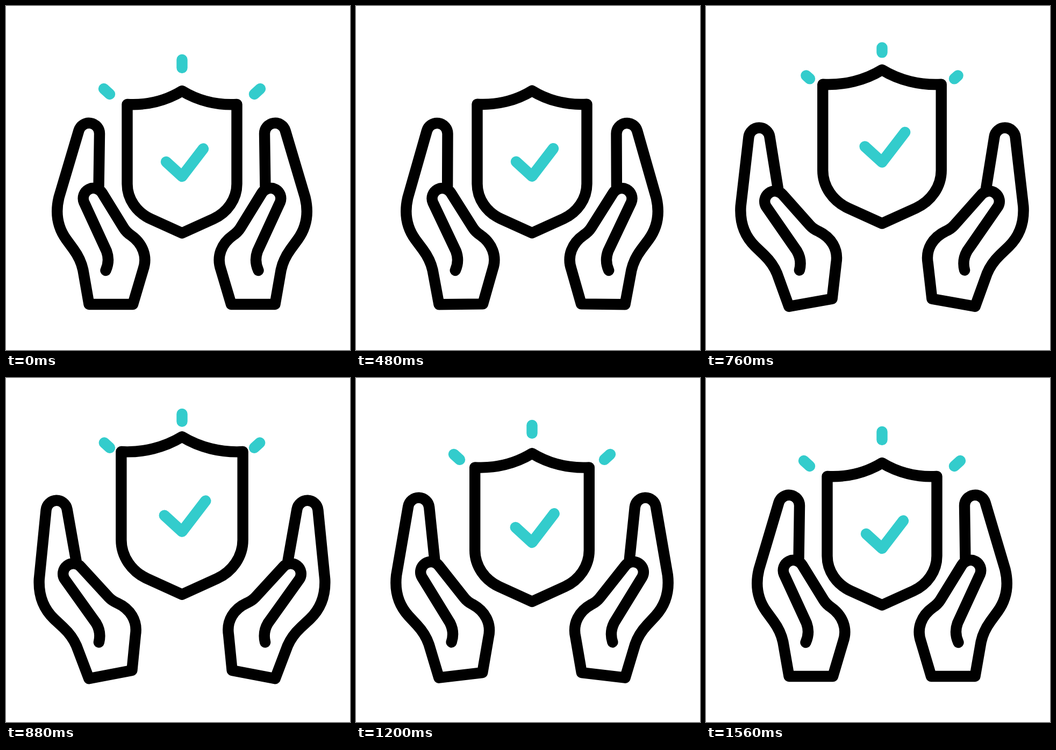
An HTML page for the animation above (1680 ms loop, 640 by 640 pixels).

```html
<!DOCTYPE html>
<html lang="en">
<head>
<meta charset="utf-8">
<title>Protected shield</title>
<style>
  html, body { margin: 0; height: 100%; overflow: hidden; background: #fff; }
  svg { display: block; width: 100vw; height: 100vh; }
  path { fill: none; stroke: #000; stroke-linecap: round; stroke-linejoin: round; }
  .teal { stroke: #33cccc; }
</style>
</head>
<body>
<svg viewBox="0 0 640 640" stroke-width="20.4">
  <defs>
    <g id="hand">
      <path d="M172.5 338L174 238A19.7 19.7 0 0 0 135.4 231.9L98.5 356
        C91.5 385 95.5 411 112 434L125.5 452.5Q139 471 143.3 491L154.5 555H236L255 491
        C264 466 254 442 233 427Q224 421 219 413L178.9 347.9A19 19 0 0 0 145.2 365.2L187 456
        C191 467 191 480 185.5 492"/>
    </g>
  </defs>
  <use href="#hand" id="left"/>
  <g transform="translate(655 0) scale(-1 1)"><use href="#hand" id="right"/></g>
  <g id="shield">
    <path d="M327.5 158C298 176 262 185 225.5 183V331C225.5 359 243 384 269 396
      L327.5 422.5L386 396C412 384 429.5 359 429.5 331V183C393 185 357 176 327.5 158Z"/>
    <path class="teal" d="M298 290L327.5 317L367 265.5"/>
  </g>
  <path class="teal" id="rays"/>
</svg>
<script>
const LOOP = 1680, STROKE = 20.4;
const $ = id => document.getElementById(id);
// Each ray: inner end, then the offset to its outer end.
const rays = [[327.5, 115, 0, -15], [193, 164, -11, -10], [462, 164, 11, -10]];

// Cubic ease-in-out from 0 to 1 between two times.
function ramp(t, start, end) {
  const u = Math.min(1, Math.max(0, (t - start) / (end - start)));
  return u < 0.5 ? 4 * u ** 3 : 1 - 4 * (1 - u) ** 3;
}
const pulse = (t, upStart, upEnd, downStart, downEnd) =>
  ramp(t, upStart, upEnd) * (1 - ramp(t, downStart, downEnd));

function draw(now) {
  const t = now % LOOP;
  const tilt = `rotate(${-10.9 * pulse(t, 340, 920, 912, 1547)} 177 558)`;
  const lift = -34.5 * pulse(t, 410, 950, 890, 1450);
  const scale = 1 + 0.11 * pulse(t, 505, 935, 965, 1400);
  const length = 1 - ramp(t, -30, 400) + ramp(t, 440, 1040);

  $('left').setAttribute('transform', tilt);
  $('right').setAttribute('transform', tilt);
  $('shield').setAttribute('transform',
    `translate(327.5 ${290.5 + lift}) scale(${scale}) translate(-327.5 -290.5)`);
  // The shield grows but its line weight stays the same.
  $('shield').setAttribute('stroke-width', STROKE / scale);
  $('rays').setAttribute('d', length < 0.02 ? '' : rays.map(([x, y, dx, dy]) =>
    `M${x} ${y + lift}l${dx * length} ${dy * length}`).join(''));
}

const begin = performance.now();
function tick() {
  draw(performance.now() - begin);
  requestAnimationFrame(tick);
}
tick();
</script>
</body>
</html>
```
